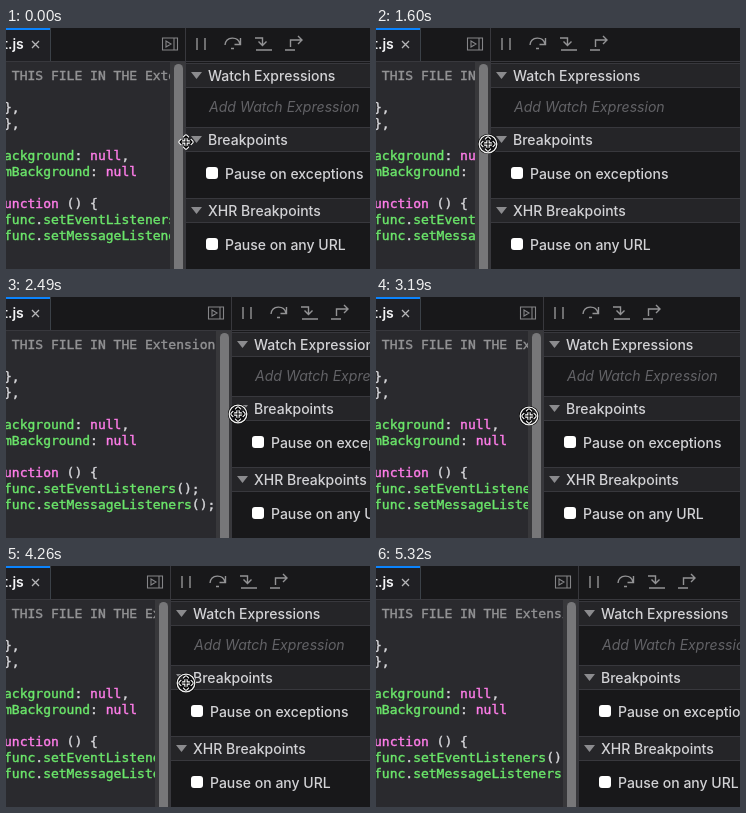
Animation, 364 px wide and 241 px high, one loop 5940 ms. Source, as an HTML page with a canvas:

```html
<!DOCTYPE html>
<html lang="en">
<head>
<meta charset="utf-8">
<title>Resizing the debugger pane</title>
<style>
  html, body { margin: 0; width: 100%; height: 100%; overflow: hidden; background: #18181a; }
  canvas { display: block; }
</style>
</head>
<body>
<canvas id="stage" width="364" height="241"></canvas>
<script>
const W = 364, H = 241, LOOP = 5940;
const PRESS = 720, RELEASE = 4890, GONE = 5320, LEAD = 72;
const ctx = document.getElementById('stage').getContext('2d');

const SANS = 'Inter, Roboto, "Liberation Sans", sans-serif';
const UI = '500 14px ' + SANS;
const MONO = '13px "DejaVu Sans Mono", "Liberation Mono", monospace';
const GREEN = '#6be66a', PINK = '#ff7de9', PALE = '#d7d7db', GREY = '#939395';
const BAR = '#18181a', CODE = '#2a2a2e', LINE = '#38383d';

// first step, last step, number of steps, divider goal, easing power
const drags = [
  [890, 1420, 7, 124, 1.41],
  [1510, 1680, 3, 111, 0.6],
  [1950, 2490, 7, 224, 0.8],
  [2570, 2660, 2, 237, 0.8],
  [2840, 3360, 7, 130, 1.27],
  [3450, 3720, 4, 114, 0.5],
  [4080, 4440, 5, 201, 1.07],
  [4620, 4620, 1, 202, 1]
];
const heights = [[720, 113], [1160, 116], [2490, 117], [3190, 119], [4260, 117]];

// row, then text and colour pairs
const code = [
  [0, ' THIS FILE IN THE Extension', GREY],
  [2, '},', PALE],
  [3, '},', PALE],
  [5, 'ackground', GREEN, ': ', PALE, 'null', PINK, ',', PALE],
  [6, 'mBackground', GREEN, ': ', PALE, 'null', PINK],
  [8, 'unction', PINK, ' () {', PALE],
  [9, 'func', GREEN, '.', PALE, 'setEventListeners', GREEN, '();', PALE],
  [10, 'func', GREEN, '.', PALE, 'setMessageListeners', GREEN, '();', PALE]
];

const clamp = v => Math.max(0, Math.min(1, v));
const stepGap = (a, b, n) => n > 1 ? (b - a) / (n - 1) : 90;

// The picture only changes at these moments.
const steps = [{ at: 0, t: 0 }, { at: PRESS, t: PRESS }];
for (const [a, b, n] of [...drags, [RELEASE, GONE, 6]]) {
  for (let i = 0; i < n; i++) {
    const t = a + i * stepGap(a, b, n);
    steps.push({ at: Math.round(t / 10) * 10, t });
  }
}

function dividerAt(t) {
  let x = 179;
  for (const [a, b, n, goal, power] of drags) {
    const gap = stepGap(a, b, n);
    x += (goal - x) * clamp((t - a + gap) / (n * gap)) ** power;
  }
  return x;
}

function heightAt(t) {
  let y = heights[0][1];
  for (let i = 1; i < heights.length; i++) {
    const [t0, y0] = heights[i - 1], [t1, y1] = heights[i];
    y += (y1 - y0) * clamp((t - t0) / (t1 - t0));
  }
  return y;
}

function box(x, y, w, h, color) {
  ctx.fillStyle = color;
  ctx.fillRect(x, y, w, h);
}

function rounded(x, y, w, h, r, color) {
  ctx.fillStyle = color;
  ctx.beginPath();
  ctx.roundRect(x, y, w, h, r);
  ctx.fill();
}

function text(str, x, y, color, font, bolder = 0) {
  ctx.font = font;
  ctx.fillStyle = ctx.strokeStyle = color;
  ctx.fillText(str, x, y);
  if (bolder) {
    ctx.lineWidth = bolder;
    ctx.strokeText(str, x, y);
  }
}

function shape(d, x, y, stroke, width, fill) {
  const path = new Path2D(d);
  ctx.save();
  ctx.translate(x, y);
  if (fill) { ctx.fillStyle = fill; ctx.fill(path); }
  if (stroke) { ctx.strokeStyle = stroke; ctx.lineWidth = width; ctx.stroke(path); }
  ctx.restore();
}

function drawEditor(div) {
  box(0, 0, div, H, CODE);
  ctx.save();
  ctx.beginPath();
  ctx.rect(0, 34, div - 15, H);
  ctx.clip();
  for (const [row, ...parts] of code) {
    let x = -2;
    for (let i = 0; i < parts.length; i += 2) {
      text(parts[i], x, 52 + row * 16, parts[i + 1], MONO, 0.4);
      x += ctx.measureText(parts[i]).width;
    }
  }
  ctx.restore();

  box(div - 15, 34, 15, H, '#38383b');
  rounded(div - 11, 36, 9, H, 4.5, '#777779');

  box(0, 0, div, 33, BAR);
  box(0, 0, 44, 33, '#202024');
  box(0, 0, 44, 2, '#0a84ff');
  box(44, 0, 1, 33, '#3b4148');
  box(0, 33, div, 1, LINE);
  text('t.js', -3, 21, '#f5f5f7', '600 14px ' + SANS);
  shape('M-3.5-3.5L3.5 3.5M3.5-3.5L-3.5 3.5', 29.5, 16.5, '#b5b5b8', 1.3);
  shape('M.5.5H15.5V12.5H.5ZM12 .5V12.5M4 3.5L9 6.5L4 9.5Z', div - 23, 9.5, '#858588', 1.1);
}

function drawHeader(label, x, y) {
  box(x, y, W, 25, '#252528');
  box(x, y, W, 1, LINE);
  box(x, y + 24, W, 1, LINE);
  shape('M0 0H11L5.5 7Z', x + 6, y + 9, null, 0, '#8b8b8e');
  text(label, x + 23, y + 18, '#d2d2d5', UI);
}

function drawOption(label, x, y) {
  rounded(x + 21, y, 12, 12, 3, '#fff');
  text(label, x + 40, y + 12, '#d2d2d5', UI);
}

function drawPanel(div) {
  box(div, 0, W, H, BAR);
  box(div, 33, W, 1, LINE);
  const icon = (d, x) => shape(d, div + x, 0, GREY, 1.4);
  icon('M1 10V22M9 10V22', 11);
  icon('M1 17C2 8 14 8 16 16M16.5 10V16.5H10.5M7 20.5H10', 39);
  icon('M0 10H7.5V17M3.5 13.5L7.5 17.5L11.5 13.5M1 22H17', 70);
  icon('M0 22H10M5.5 19V12H17M13 8L17 12L13 16', 100);

  drawHeader('Watch Expressions', div, 35);
  text('Add Watch Expression', div + 24, 84, '#626266', 'italic 14.1px ' + SANS);
  drawHeader('Breakpoints', div, 99);
  drawOption('Pause on exceptions', div, 139);
  drawHeader('XHR Breakpoints', div, 170);
  drawOption('Pause on any URL', div, 210);
  box(div, 0, 1, H, LINE);
}

function drawResizer(x, y, pressed) {
  if (pressed) {
    ctx.beginPath();
    ctx.arc(x, y, 8.8, 0, Math.PI * 2);
    ctx.fillStyle = 'rgba(10,10,12,.75)';
    ctx.fill();
    ctx.strokeStyle = '#000';
    ctx.lineWidth = 2.6;
    ctx.stroke();
    ctx.strokeStyle = '#f2f2f2';
    ctx.lineWidth = 1.3;
    ctx.stroke();
  }
  const cross = 'M-6 0H6M0-6V6M-4-2L-6 0L-4 2M4-2L6 0L4 2M-2-4L0-6L2-4M-2 4L0 6L2 4';
  ctx.lineJoin = 'round';
  shape(cross, x, y, '#fff', 3.4);
  shape(cross, x, y, '#000', 1.2);
  ctx.lineJoin = 'miter';
}

function drawPointer(t) {
  if (t < RELEASE) {
    const pressed = t >= PRESS;
    const y = pressed ? heightAt(t) : 114;
    drawResizer(Math.round(dividerAt(t + LEAD)) + 1, Math.round(y), pressed);
  } else if (t < GONE) {
    const gap = stepGap(RELEASE, GONE, 6);
    const u = ((t - RELEASE + gap) / (6 * gap)) ** 1.3;
    shape('M0 0V14L3.5 11L6 16.5L8.5 15.5L6 10H10.5Z',
      203 - 108 * u, 117 + 143 * u, '#fff', 1.2, '#000');
  }
}

function draw(now) {
  const time = now % LOOP;
  const { t } = steps.findLast(s => s.at <= time);
  const div = Math.round(dividerAt(t));
  drawEditor(div);
  drawPanel(div);
  drawPointer(t);
}

let start;
function tick(now) {
  start ??= now;
  draw(Math.max(0, now - start));
  requestAnimationFrame(tick);
}
requestAnimationFrame(tick);
</script>
</body>
</html>
```
